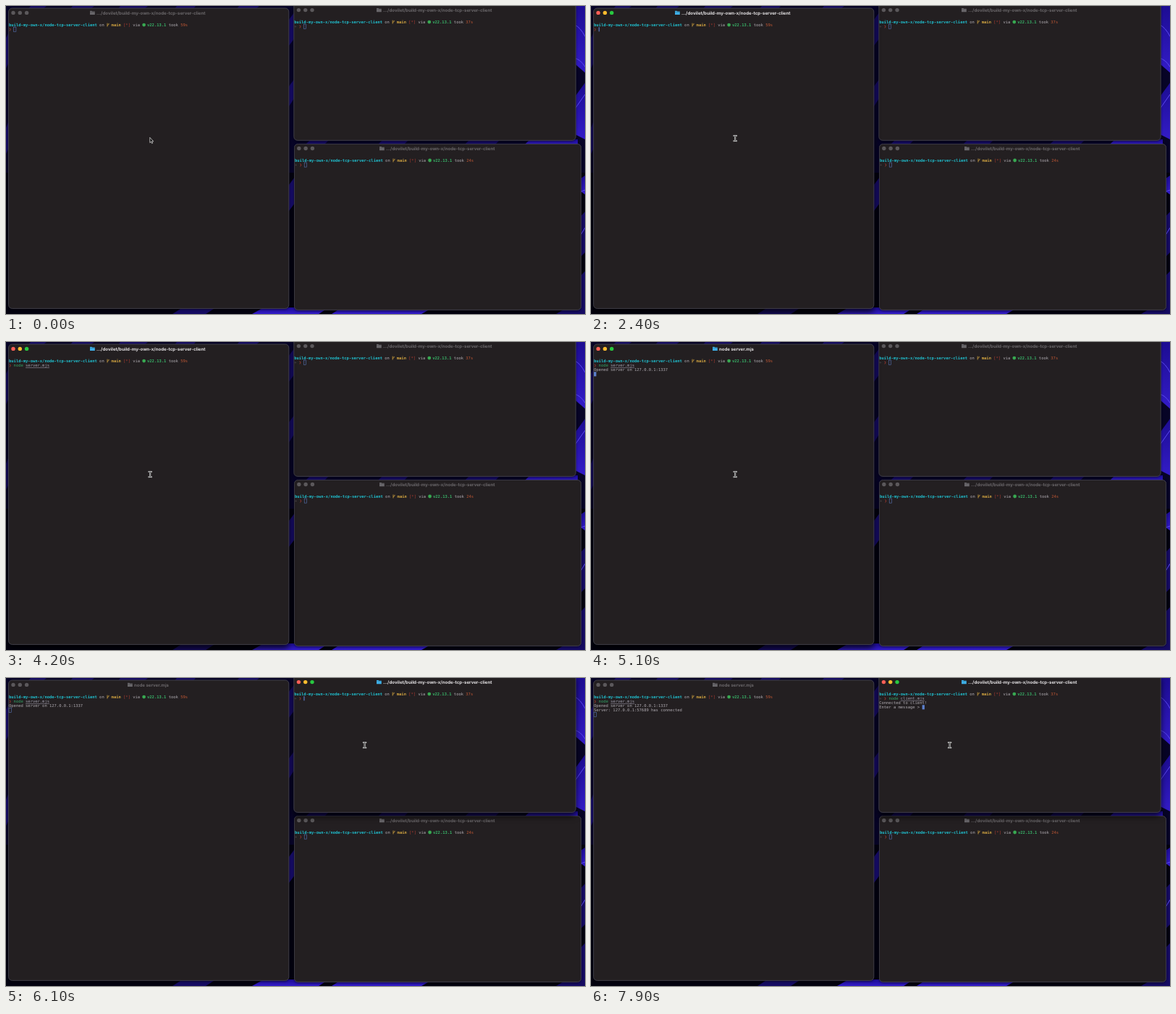
Recreate the animation shown at these times as an HTML page. Size 800 by 425 pixels, loop 8 s.

```html
<!DOCTYPE html>
<html lang="en">
<head>
<meta charset="utf-8">
<title>TCP server and client</title>
<style>
  html, body { margin: 0; width: 100%; height: 100%; overflow: hidden; background: #03020f; }
  svg { display: block; width: 800px; height: 425px; }
  text { white-space: pre; text-rendering: geometricPrecision; }
  .mono { font: 5.48px "DejaVu Sans Mono", monospace; fill: #aeaab0; }
  .title { font: 700 6.1px Inter, sans-serif; fill: #6a676a; }
  .frame { fill: #231f21; stroke: #4b4a55; stroke-width: .8; filter: drop-shadow(0 1px 1.5px #0008); }
  .light { fill: #5b585b; }
  .folder { fill: #68666a; }
  .active .title { fill: #e4e2e4; }
  .active .folder { fill: #3eaee6; }
  .active .frame { filter: drop-shadow(0 5px 4px #000b); }
  .active .light:nth-of-type(1) { fill: #ff5f57; }
  .active .light:nth-of-type(2) { fill: #febc2e; }
  .active .light:nth-of-type(3) { fill: #28c840; }
  .path { fill: #20bdcc; font-weight: 700; }
  .branch { fill: #d3a540; font-weight: 700; }
  .red { fill: #a93a30; }
  .took { fill: #bd5634; }
  .version { fill: #38b368; font-weight: 700; }
  .cmd { fill: #32a064; }
  .file { fill: #a09dac; text-decoration: underline; }
  .hint { fill: #504b4e; }
  .hollow { fill: none; stroke: #5673b4; stroke-width: .6; }
  .block, .beam { fill: #5c80cc; }
</style>
</head>
<body>
<svg viewBox="0 0 800 425" xmlns="http://www.w3.org/2000/svg">
  <defs>
    <linearGradient id="blue" x2="0" y2="1">
      <stop offset="0" stop-color="#1c0c92"/>
      <stop offset="1" stop-color="#331cc8"/>
    </linearGradient>
  </defs>
  <rect width="800" height="425" fill="#03020f"/>
  <path d="M0 0H800V230H0Z" fill="#070426"/>
  <g fill="url(#blue)">
    <path d="M784 0H800V92L784 78Z"/>
    <path d="M784 128L800 106V184L784 176Z"/>
    <path d="M716 192L724 184H790V192Z"/>
    <path d="M794 238L800 234V260L794 256Z"/>
    <path d="M340 425L356 416H446L432 425Z"/>
    <path d="M450 425L464 416H590L574 425Z"/>
  </g>
  <g fill="#150b62">
    <path d="M34 0H56L50 5H30ZM92 0H122L116 5H88ZM158 0H196L190 5H154ZM236 0H262L258 5H232ZM322 0H350L344 5H318Z"/>
    <path d="M0 44L4 36V78L0 86ZM0 168L4 158V196L0 204Z"/>
    <path d="M390 20L399 8V44L390 56ZM390 112L399 100V126L390 140ZM390 248L399 236V272L390 284Z"/>
    <path d="M420 185H446L440 191H414ZM520 185H556L550 191H514ZM640 185H682L676 191H634Z"/>
    <path d="M794 290L800 284V340L794 346ZM794 372L800 366V425H760L772 418H794Z"/>
    <path d="M230 425L244 416H290L276 425Z"/>
  </g>
  <g fill="none" stroke="#5b49f2" stroke-width="1">
    <path d="M786 72Q794 74 800 84M786 26Q794 30 800 42M794 256L800 254M794 316L800 306M786 142L800 122"/>
  </g>
  <g id="stage"></g>
  <g id="mouse">
    <path id="arrow" d="M-.4 -1.2V6L1.2 4.6L2.3 7L3.5 6.5L2.4 4.1H4.5Z" fill="#111" stroke="#eee" stroke-width=".7" stroke-linejoin="round"/>
    <g id="ibeam" fill="none" stroke-linecap="round">
      <path d="M-1.8 -3.6Q0 -3.6 0 -2.4Q0 -3.6 1.8 -3.6M0 -2.4V2.4M-1.8 3.6Q0 3.6 0 2.4Q0 3.6 1.8 3.6" stroke="#eee" stroke-width="1.9"/>
      <path d="M-1.8 -3.6Q0 -3.6 0 -2.4Q0 -3.6 1.8 -3.6M0 -2.4V2.4M-1.8 3.6Q0 3.6 0 2.4Q0 3.6 1.8 3.6" stroke="#222" stroke-width=".7"/>
    </g>
  </g>
</svg>
<script>
const LOOP = 8000, COL = 3.3, ROW = 6.05;
const FOLDER = '.../dovilet/build-my-own-x/node-tcp-server-client';
const $ = id => document.getElementById(id);

const span = (cls, s) => `<tspan class="${cls}">${s}</tspan>`;
// Wraps markup so that it shows only between two times.
const during = (from, to, body) => `<g data-from="${from}" data-to="${to}">${body}</g>`;

function title(x, y, s) {
  return `<path class="folder" d="M${x - 9} ${y - 2.6}h2.6l.8 .8h3.4v4.5h-6.8z"/>
    <path d="M${x - 9} ${y - .9}h6.8" stroke="#0004" stroke-width=".5"/>
    <text class="title" x="${x}" y="${y + 2.2}">${s}</text>`;
}

function terminal({ id, x, y, w, h, bar, lights, text, base, took, titles, body }) {
  const at = col => text + col * COL;
  const line = (row, s, col = 0) => `<text class="mono" x="${at(col)}" y="${base + row * ROW}">${s}</text>`;
  const cursor = (cls, row, col) => {
    const width = cls === 'beam' ? 1.1 : 3.3;
    return `<rect class="${cls}" x="${at(col)}" y="${base + row * ROW - 4.9}" width="${width}" height="6.1"/>`;
  };
  const dots = [0, 1, 2].map(i =>
    `<circle class="light" cx="${lights + i * 9.3}" cy="${bar}" r="2.7"/>`).join('');
  const prompt = line(0, span('path', 'build-my-own-x/node-tcp-server-client') + ' on   '
    + span('branch', 'main') + ' ' + span('red', '[*]') + ' via   '
    + span('version', 'v22.13.1') + ' took ' + span('took', took));
  const bx = at(41) + .7, by = base - 4.4;
  const icons = `<path d="M${bx} ${by}v5M${bx + 2} ${by + .3}v1.5l-2 1.4" fill="none" stroke="#d3a540" stroke-width=".8"/>
    <circle cx="${at(56) + 1.8}" cy="${base - 1.9}" r="2.4" fill="#38a851"/>`;
  return `<g id="${id}">
    <rect class="frame" x="${x}" y="${y}" width="${w}" height="${h}" rx="5"/>
    ${dots}${titles}${prompt}${icons}${body(line, cursor)}</g>`;
}

// Typed part of "node" in red, the rest of the suggestion in grey.
const typing = (line, col, file, times) => times.slice(0, -1).map((from, i) => {
  const n = i + 1, full = 'node ' + file;
  return during(from, times[n], line(1, span('red', full.slice(0, n)) + span('hint', full.slice(n)), col));
}).join('');
const command = file => span('cmd', 'node') + ' ' + span('file', file);
const mark = s => span('red', s);

const bottom = terminal({
  id: 'bottom', x: 398.4, y: 190.4, w: 396.2, h: 229, bar: 196.5, lights: 404.8,
  text: 399, base: 214.9, took: '24s', titles: title(525, 196.5, FOLDER),
  body: (line, cursor) => line(1, span('hint', '+') + mark(' ❯')) + cursor('hollow', 1, 4)
});

const upper = terminal({
  id: 'upper', x: 397.8, y: -5, w: 389.4, h: 190.4, bar: 5.6, lights: 404.4,
  text: 398.2, base: 24, took: '37s', titles: title(521, 5.6, FOLDER),
  body: (line, cursor) => line(1, span('hint', '+') + mark(' ❯'))
    + during(0, 6100, cursor('hollow', 1, 4))
    + during(6100, 6700, cursor('beam', 1, 4))
    + typing(line, 4, 'client.mjs', [7000, 7100, 7200, 7300, 7700])
    + during(7000, 7100, cursor('beam', 1, 5))
    + during(7100, 7200, cursor('beam', 1, 6))
    + during(7200, 7300, cursor('beam', 1, 7))
    + during(7300, 7500, cursor('beam', 1, 8))
    + during(7700, LOOP, line(1, command('client.mjs'), 4))
    + during(7700, 7800, cursor('beam', 1, 19))
    + during(7800, 7900, cursor('block', 2, 0))
    + during(7900, LOOP, line(2, 'Connected to client!') + line(3, 'Enter a message &gt; ') + cursor('block', 3, 18))
});

const left = terminal({
  id: 'left', x: 3.5, y: 3, w: 387.3, h: 414.4, bar: 9.4, lights: 10,
  text: 4, base: 28, took: '59s',
  titles: during(0, 5050, title(125, 9.4, FOLDER)) + during(5050, LOOP, title(177, 9.4, 'node server.mjs')),
  body: (line, cursor) => line(1, mark('❯'))
    + during(0, 2000, cursor('hollow', 1, 2))
    + during(2000, 2600, cursor('beam', 1, 2))
    + typing(line, 2, 'server.mjs', [3100, 3200, 3300, 3500, 3600])
    + during(3600, LOOP, line(1, command('server.mjs'), 2))
    + during(3600, 4200, cursor('beam', 1, 17))
    + during(4800, 5000, cursor('beam', 1, 17))
    + during(5000, 5100, cursor('block', 2, 0))
    + during(5100, LOOP, line(2, 'Opened server on 127.0.0.1:1337'))
    + during(5100, 5900, cursor('block', 3, 0))
    + during(5900, 7900, cursor('hollow', 3, 0))
    + during(7900, LOOP, line(3, 'Server: 127.0.0.1:57689 has connected') + cursor('hollow', 4, 0))
});

$('stage').innerHTML = bottom + upper + left;

const timed = [...document.querySelectorAll('[data-from]')]
  .map(el => ({ el, from: +el.dataset.from, to: +el.dataset.to }));
const show = (el, on) => { el.style.display = on ? '' : 'none'; };
const ease = p => p * p * (3 - 2 * p);
const clamp = p => Math.max(0, Math.min(1, p));

function draw() {
  const t = (performance.now() + 15) % LOOP;
  for (const { el, from, to } of timed) show(el, t >= from && t < to);
  $('left').classList.toggle('active', t >= 2000 && t < 6100);
  $('upper').classList.toggle('active', t >= 6100);
  const p = ease(clamp((t - 5450) / 500));
  $('mouse').setAttribute('transform', `translate(${199.2 + 296.4 * p} ${182.6 - 90 * p})`);
  show($('arrow'), t < 2000);
  show($('ibeam'), t >= 2000);
  requestAnimationFrame(draw);
}
draw();
</script>
</body>
</html>
```
